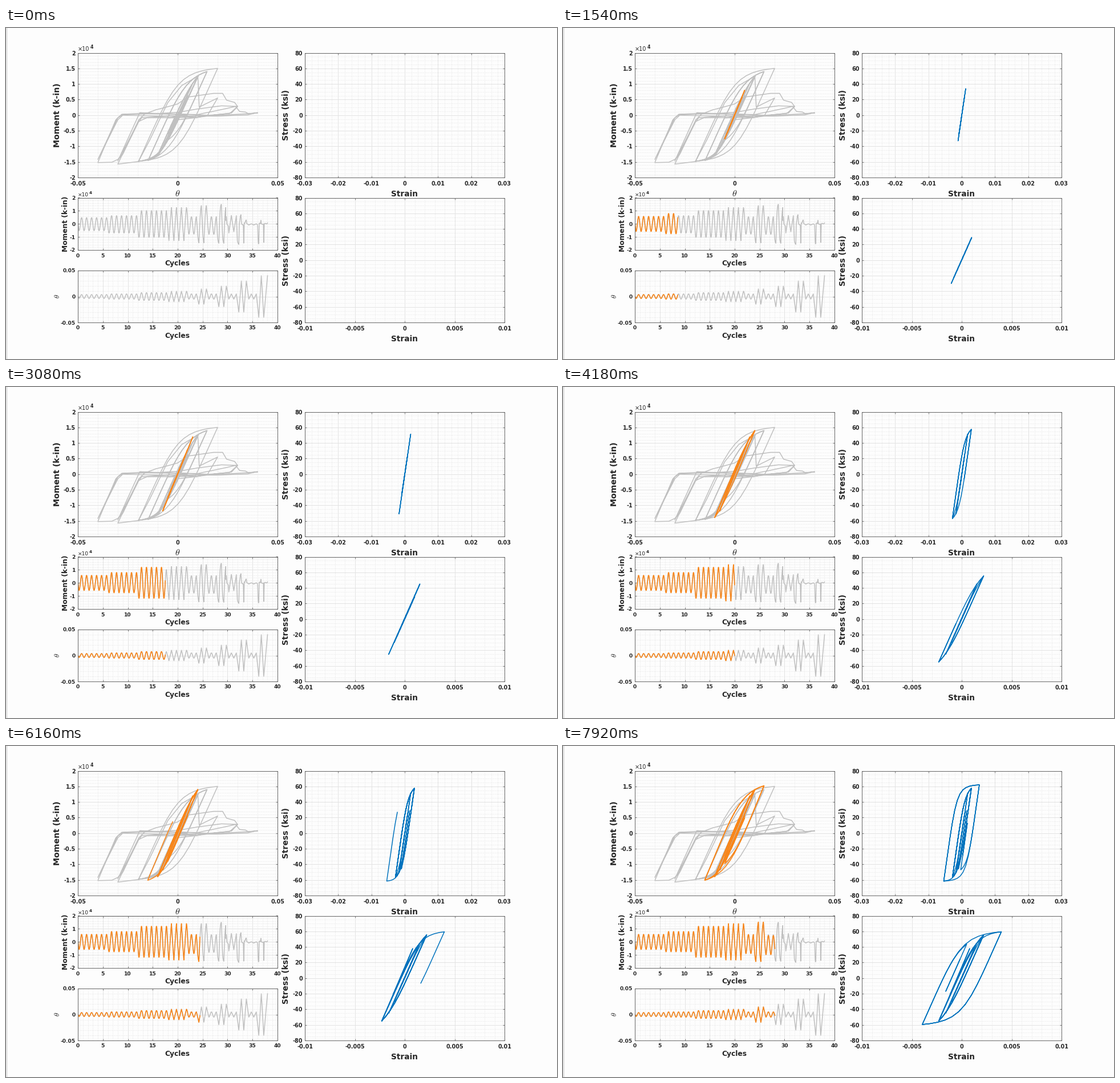
A matplotlib script that plays this animation: 966 by 580 pixels, repeating every 8000 ms.

```python
import numpy as np
import matplotlib.pyplot as plt
from matplotlib.animation import FuncAnimation

W, H, DPI = 966, 580, 100
LOOP, INTERVAL, STEP = 8000, 100, 110
INK, BACK = "#262626", "#fdfdfd"
GRAY, ORANGE, BLUE = "#c0c0c0", "#f8861a", "#0072bd"
PX = 72 / DPI

plt.rcParams.update({"font.family": "DejaVu Sans", "mathtext.fontset": "cm",
                     "axes.unicode_minus": False})


# ---- hysteresis data -------------------------------------------------------
def branch(start, end, stiffness, power):
    """Loading branch that leaves start at the given stiffness and bends over."""
    s = np.linspace(0, 1, 15)
    (x0, y0), (x1, y1) = start, end
    ratio = stiffness * (x1 - x0) / (y1 - y0)
    if ratio <= 1.08:
        u = v = (1 - np.cos(np.pi * s)) / 2
    else:
        u = s ** power
        p = (ratio ** 4 - 1) ** 0.25
        v = u * ratio / (1 + (p * u) ** 4) ** 0.25
    return s, x0 + u * (x1 - x0), y0 + v * (y1 - y0)


def response(levels, stiffness, power=1.0):
    """Rows: cycle, x, y. Levels: (cycles, first reversal, second reversal)."""
    time, point, cycle, parts = 0, (0, 0), 0, []
    for count, first, second in levels:
        for _ in range(count):
            for when, target in ((cycle + 0.25, first), (cycle + 0.75, second)):
                s, x, y = branch(point, target, stiffness, power)
                parts.append(np.array([time + s * (when - time), x, y]))
                time, point = when, target
            cycle += 1
    return np.hstack(parts)


def follow(series, paths, times):
    """Append half cycles given as (drift / 1000, moment / 100) points."""
    for path, end in zip(paths, times):
        t0, x0 = series[0, -1], series[1, -1]
        x, y = np.array(path).T / [[1000], [100]]
        t = t0 + (end - t0) * (x - x0) / (x[-1] - x0)
        series = np.hstack([series, [t, x, y]])
    return series


model = response([
    (6, (-.00375, -.58), (.00375, .58)), (6, (-.005, -.76), (.005, .80)),
    (6, (-.0075, -1.18), (.0076, 1.20)), (4, (-.01, -1.39), (.0101, 1.40)),
    (2, (-.005, -.90), (.005, .57)), (2, (-.015, -1.51), (.0147, 1.52)),
    (3, (-.005, -.98), (.005, .49))], 155)

upper = response([
    (6, (-.00085, -25), (.0009, 25.5)), (6, (-.0011, -33), (.0012, 34)),
    (6, (-.0017, -51), (.0018, 51.5)), (4, (-.0028, -57), (.0029, 57.5)),
    (2, (-.001, -46), (.0015, 29)), (2, (-.0054, -61.5), (.0053, 62)),
    (3, (-.0003, -47), (.0017, 13))], 30000, 1.4)

lower = response([
    (6, (.00076, 22), (-.0008, -22.5)), (6, (.001, 29), (-.00105, -30)),
    (6, (.00152, 45), (-.0016, -45)), (4, (.0022, 55.5), (-.0023, -55)),
    (2, (.0008, 38), (-.0013, -25)), (2, (.00397, 59.5), (-.00395, -59.5)),
    (3, (.0005, 43.5), (-.0016, -17))], 28700, 1.4)

test = response([
    (6, (-.00375, -.52), (.00375, .48)), (6, (-.005, -.70), (.005, .63)),
    (6, (-.0075, -1.03), (.0075, 1.02)), (4, (-.01, -1.28), (.0102, 1.25)),
    (2, (-.005, -.78), (.005, .55)), (2, (-.0148, -1.45), (.0147, 1.40)),
    (2, (-.005, -.80), (.005, .55)), (2, (-.0196, -1.48), (.02, 1.50))], 142)
test = test[:, test[0] <= 29.25]

fracture = [
    [(-14, -80), (-5, 40), (2, 95), (10.1, 125), (10.8, 26), (20, 55)],
    [(15, 0), (10, -7), (0, -15), (-5, -70)],
    [(5, 65)], [(-5, -60)], [(5, 63)],
    [(-5, -70), (-9.5, -128), (-14.5, -142), (-20, -149), (-30, -157)],
    [(-19.5, -15), (-16.5, 4), (-11, 17), (-5, 27), (0, 36), (5, 58),
     (18, 70), (22.5, 70), (24.5, 48), (28.5, 41), (30, 28)],
]
decay = [
    [(27, 7), (20, 2), (10, -7), (-18, -8), (-20, -25), (-30, -147)],
    [(-19, 8), (-10, 5), (0, 9), (10, 20), (22, 30), (30, 28)],
    [(26, 5), (10, -3), (-5, -9)],
    [(5, 1)], [(-5, -9)], [(5, 1)],
    [(-15, -7), (-19.5, -20), (-27.5, -125), (-30, -142), (-33, -151), (-40, -152)],
    [(-31, -15), (-28, 3), (-15, 6), (10, 2), (22, 18), (29, 28), (31, 12),
     (34, 10), (35.5, 4), (40, 8)],
    [(35, 1), (20, -3), (-10, -3), (-27.5, 0), (-30, -15), (-40, -142)],
    [(-30, -8), (-27.5, 2), (-15, 4), (0, 3), (20, -1), (40, 7)],
]
test = follow(test, fracture + decay, [*np.arange(29.75, 37.5, 0.5), 38])


def until(series, cycle):
    n = np.searchsorted(series[0], cycle)
    tip = [[np.interp(cycle, series[0], row)] for row in series]
    return np.hstack([series[:, :n], tip])


# ---- stage -----------------------------------------------------------------
fig = plt.figure(figsize=(W / DPI, H / DPI), dpi=DPI, facecolor=BACK)


def label(x, y, text, size, **options):
    style = dict(ha="center", va="center", color=INK, weight="bold")
    fig.text(x / W, 1 - y / H, text, size=size * PX, **{**style, **options})


def panel(box, xlim, ylim, xticks, yticks, xminor, yminor, size):
    left, top, right, bottom = box
    ax = fig.add_axes([left / W, 1 - bottom / H, (right - left) / W, (bottom - top) / H],
                      facecolor=BACK)
    ax.set(xlim=xlim, ylim=ylim)
    ax.set_xticks(xticks, [f"{round(v, 6):g}" for v in xticks])
    ax.set_yticks(yticks, [f"{round(v, 6):g}" for v in yticks])
    dots = dict(colors="#e2e2e2", linewidths=PX, linestyles=[(0, (1, 2))], zorder=0)
    ax.vlines(np.arange(xlim[0] + xminor, xlim[1] - xminor / 2, xminor), *ylim, **dots)
    ax.hlines(np.arange(ylim[0] + yminor, ylim[1] - yminor / 2, yminor), *xlim, **dots)
    ax.grid(color="#e3e3e3", lw=PX)
    ax.set_axisbelow(True)
    ax.tick_params(direction="in", length=3 * PX, width=0.8 * PX, color="#5a5a5a",
                   top=True, right=True, labelsize=size * PX, labelcolor=INK)
    ax.tick_params(axis="x", pad=5.5 * PX)
    ax.tick_params(axis="y", pad=4 * PX)
    for text in ax.get_xticklabels() + ax.get_yticklabels():
        text.set_weight("bold")
    for spine in ax.spines.values():
        spine.set(color="#5a5a5a", linewidth=0.9 * PX)
    return ax


def trace(ax, color, width, x=(), y=()):
    return ax.plot(x, y, color=color, lw=width * PX, solid_joinstyle="round")[0]


drift = (-.05, .05)
weeks = np.arange(0, 41, 5)
stress = np.arange(-80, 81, 20)
loop_ax = panel((126, 43.5, 476, 262), drift, (-2, 2), [-.05, 0, .05],
                np.arange(-2, 2.1, .5), .01, .1, 9.7)
moment_ax = panel((126, 297.5, 476, 389), (0, 40), (-2, 2), weeks,
                  np.arange(-2, 3), 1, .2, 9.1)
drift_ax = panel((126, 425, 476, 516), (0, 40), drift, weeks, [-.05, 0, .05], 1, .01, 9.1)
upper_ax = panel((524, 43.5, 874, 262), (-.03, .03), (-80, 80),
                 np.arange(-3, 4) / 100, stress, .002, 5, 9.7)
lower_ax = panel((524, 297.5, 874, 516), (-.01, .01), (-80, 80),
                 np.arange(-2, 3) / 200, stress, .001, 5, 9.7)

label(90, 152.5, "Moment (k-in)", 14.1, rotation=90)
label(104.5, 343, "Moment (k-in)", 12.3, rotation=90)
label(90.5, 470, r"$\theta$", 13, rotation=90)
label(301, 290.5, r"$\theta$", 16)
for y in (412.5, 539.5):
    label(300.5, y, "Cycles", 12.2)
for y, mid in ((291, 152.5), (545, 407)):
    label(699, y, "Strain", 13.7)
    label(491, mid, "Stress (ksi)", 13.9, rotation=90)
for y, size in ((37, 9.8), (292.5, 9)):
    label(126, y, "×10", size, ha="left", weight="normal")
    label(126 + 2.2 * size, y - 4, "4", size * .8, ha="left")
for x in (0.5, W - 0.5):
    fig.add_artist(plt.Line2D([x / W] * 2, [0, 1], color="#c4c4c4", lw=PX))

views = [(loop_ax, 1, 2), (moment_ax, 0, 2), (drift_ax, 0, 1)]
for ax, i, j in views:
    trace(ax, GRAY, 1.5, test[i], test[j])
model_lines = [(trace(ax, ORANGE, 1.6), i, j) for ax, i, j in views]
fibres = [(trace(upper_ax, BLUE, 1.5), upper), (trace(lower_ax, BLUE, 1.5), lower)]

# Larger cycles hold more load steps, so the cycle count advances unevenly.
STEPS = [0, 14, 28, 28.8, 38, 45, 48, 51.3, 56, 68.8, 72]
CYCLES = [0, 8.6, 17.52, 18, 20, 21.4, 22, 24, 24.46, 26, 28.06]


def update(frame):
    step = (frame * INTERVAL + INTERVAL - 1) // STEP
    cycle = np.interp(step, STEPS, CYCLES)
    shown = until(model, cycle)
    for line, i, j in model_lines:
        line.set_data(shown[i], shown[j])
    for line, series in fibres:
        line.set_data(*until(series, cycle)[1:])
    return [line for line, *_ in model_lines + fibres]


anim = FuncAnimation(fig, update, frames=LOOP // INTERVAL, interval=INTERVAL,
                     repeat=True, repeat_delay=0)
plt.show()
```
